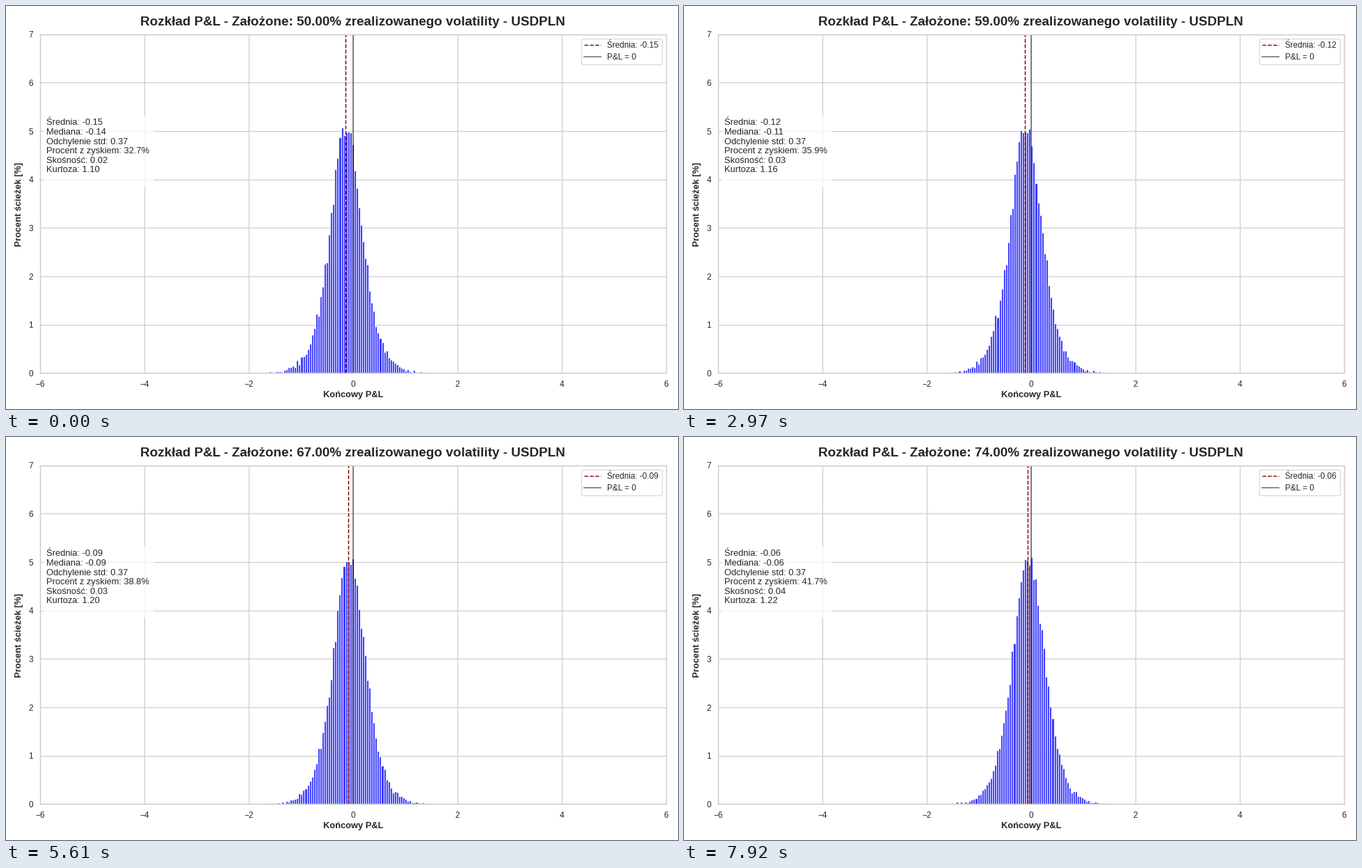
Animation, 966 px wide and 580 px high, one loop 8 s. Source, as a matplotlib script:

```python
import numpy as np
import matplotlib.pyplot as plt
from matplotlib.animation import FuncAnimation
from matplotlib.patches import Rectangle

W, H, DPI = 966, 580, 100
PT = 0.8475                      # scale of every point size
INTERVAL, FRAMES, STEP = 40, 200, 330
LEVEL0, LEVEL1 = 50, 74          # assumed volatility at both ends of the loop
INK, GRID = "#262626", "#cccccc"
ZERO_X, UNIT_X = 499.0, 74.95    # pixels of x = 0 and of one x unit
TOP, BOTTOM = 40.8, 528.4

PITCH = 3.055                    # bar spacing in pixels
PEAK, SPREAD = 5.1, 0.202        # logistic density of the results
BARS = np.arange(-39, 39)
NOISE = np.random.default_rng(4).normal(0, 0.07, (2, BARS.size))

plt.rcParams.update({
    "font.family": "Liberation Sans",
    "text.color": INK,
    "axes.labelcolor": INK,
    "xtick.color": INK,
    "ytick.color": INK,
})


def mean_at(level):
    return -0.1476 + 0.0035 * (level - LEVEL0)


def histogram(level):
    """Bar centres on the x axis and heights in percent."""
    t = level - LEVEL0
    centre = (492.2 + 0.175 * t + PITCH * BARS - ZERO_X) / UNIT_X
    dist = centre - mean_at(level) - 0.008
    smooth = PEAK / np.cosh(dist / (2 * SPREAD)) ** 2
    # sampling noise grows with the root of the count and drifts slowly
    turn = t / (LEVEL1 - LEVEL0)
    noise = np.cos(turn) * NOISE[0] + np.sin(turn) * NOISE[1]
    height = smooth + np.sqrt(smooth) * noise
    return centre, np.round(np.maximum(height, 0), 2)


def stats(level):
    t = level - LEVEL0
    median = -0.14 + 0.01 * (t // 3)
    profit = np.interp(level, [50, 55, 62, 67, 74],
                       [32.7, 34.4, 37.0, 38.8, 41.66])
    skew = 0.02 + 0.01 * (t >= 2) + 0.01 * (t >= 20)
    kurtosis = 1.10 + 0.01 * int(0.975 + 0.695 * t - 0.0093 * t * t)
    return [
        f"Średnia: {mean_at(level):.2f}",
        f"Mediana: {median:.2f}",
        "Odchylenie std: 0.37",
        f"Procent z zyskiem: {profit:.1f}%",
        f"Skośność: {skew:.2f}",
        f"Kurtoza: {kurtosis:.2f}",
    ]


def label(x, y, text, size, **kw):
    """Text with its baseline at a stage pixel, y counted from the top."""
    return fig.text(x / W, 1 - y / H, text, fontsize=size * PT,
                    va="baseline", **kw)


fig = plt.figure(figsize=(W / DPI, H / DPI), dpi=DPI, facecolor="white")
ax = fig.add_axes([(ZERO_X - 6 * UNIT_X) / W, 1 - BOTTOM / H,
                   12 * UNIT_X / W, (BOTTOM - TOP) / H])
ax.set_axisbelow(True)
ax.grid(color=GRID, lw=PT)
ax.tick_params(length=0, pad=7.3, labelsize=10 * PT)
for spine in ax.spines.values():
    spine.set(color=GRID, linewidth=1.25 * PT)

bars = ax.bar(BARS, np.zeros(BARS.size), PITCH / UNIT_X, color="blue",
              edgecolor="white", lw=PT, alpha=0.8)
ax.set(xlim=(-6, 6), ylim=(0, 7), xticks=range(-6, 7, 2), yticks=range(8))
mean_line = ax.axvline(0, color="darkred", ls="--", lw=1.25 * PT,
                       label="Średnia: -0.15")
ax.axvline(0, color="black", alpha=0.5, lw=1.5 * PT, label="P&L = 0")
legend = ax.legend(loc="upper right", fontsize=10 * PT, framealpha=0.8,
                   edgecolor=GRID, labelspacing=0.37)
legend.get_frame().set_linewidth(PT)

fig.add_artist(Rectangle((53.5 / W, 1 - 260 / H), 158 / W, 102.5 / H,
                         transform=fig.transFigure, fc="white", ec="none",
                         alpha=0.8))
title = label(498.5, 27.5, "", 16, ha="center", weight="bold")
label(499, 563.5, "Końcowy P&L", 11, ha="center", weight="bold")
label(22.5, 285, "Procent ścieżek [%]", 11, ha="center", weight="bold",
      rotation=90, rotation_mode="anchor")
lines = [label(58, 171.3 + 13.6 * i, "", 11, ha="left") for i in range(6)]


def update(i):
    level = LEVEL0 + (i * INTERVAL + INTERVAL - 1) // STEP
    title.set_text(f"Rozkład P&L - Założone: {level:.2f}% "
                   "zrealizowanego volatility - USDPLN")
    for line, text in zip(lines, stats(level)):
        line.set_text(text)
    for bar, x, h in zip(bars, *histogram(level)):
        bar.set_x(x - PITCH / UNIT_X / 2)
        bar.set_height(h)
    mean = mean_at(level)
    mean_line.set_xdata([mean, mean])
    legend.get_texts()[0].set_text(f"Średnia: {mean:.2f}")
    return []


anim = FuncAnimation(fig, update, frames=FRAMES, interval=INTERVAL,
                     init_func=lambda: update(0), repeat=True, repeat_delay=0)
plt.show()
```
